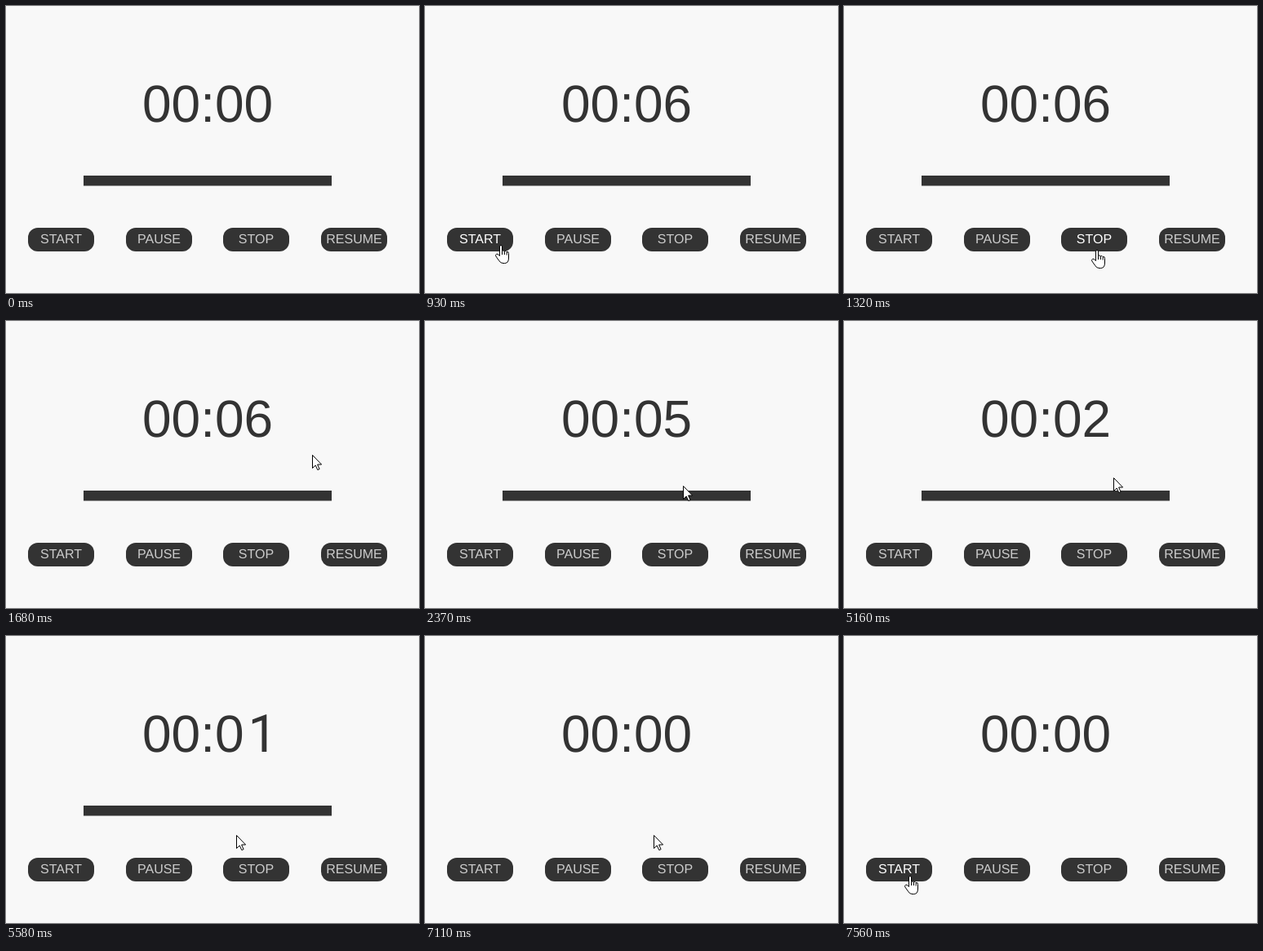
An HTML page that plays this animation: 506 px wide and 352 px high, repeating every 8 s.

```html
<!DOCTYPE html>
<html lang="en">
<head>
<meta charset="utf-8">
<title>Countdown timer</title>
<style>
  html, body { margin: 0; width: 100%; height: 100%; overflow: hidden; background: #f8f8f8; }
  svg { display: block; width: 506px; height: 352px; }
  text { font-family: "Liberation Sans", Arial, sans-serif; text-rendering: geometricPrecision; }
  .label { font-size: 16px; text-anchor: middle; }
  .one { font-family: Roboto, sans-serif; }
</style>
</head>
<body>
<svg viewBox="0 0 506 352">
  <rect width="506" height="352" fill="#f8f8f8"/>
  <text x="167" y="142" font-size="64" fill="#333">00:0<tspan id="digit">0</tspan></text>
  <rect id="bar" x="95" y="208" width="304" height="12.5" fill="#333"/>
  <g id="buttons"></g>
  <g id="cursor" fill="#fff" stroke="#000" stroke-linejoin="round">
    <path id="arrow" d="M.5 .5V16.5L4.2 13L6.8 18.6L9.1 17.6L6.6 12H11.6Z"/>
    <g id="hand" transform="translate(-6 0)">
      <path d="M5.5 13.5V2Q5.5 .5 7 .5Q8.5 .5 8.5 2V7.5Q10 5.8 11.4 7.9Q13 6.5 14.2 8.7Q16.5 7.8 16.5 10.5V16Q16.5 22.5 11.5 22.5H10Q6.8 22.5 5 19.8L.9 14Q0 12 1.5 11.3Q3 10.8 4.2 12.2Z"/>
      <path d="M8.5 7.5V12M11.4 7.9V12M14.2 8.7V12.5" fill="none"/>
    </g>
  </g>
</svg>
<script>
const LOOP = 8000, STEP = 30;
const FIRST = 750, SECOND = 955, COUNT = 6;   // countdown pace in ms
const TOP = 272, W = 81, H = 29;              // button geometry
const NS = "http://www.w3.org/2000/svg";
const $ = id => document.getElementById(id);

function add(parent, tag, attrs) {
  const el = document.createElementNS(NS, tag);
  for (const k in attrs) el.setAttribute(k, attrs[k]);
  return parent.appendChild(el);
}

const buttons = ["START", "PAUSE", "STOP", "RESUME"].map((name, i) => {
  const x = Math.round(26.8 + i * 119.8);
  const box = add($("buttons"), "rect", { x, y: TOP, width: W, height: H, rx: 12 });
  const label = add($("buttons"), "text", { x: x + W / 2, y: 291, class: "label" });
  label.textContent = name;
  return { x, box, label };
});

const linear = u => u;
const easeOut = u => 1 - (1 - u) ** 2;
const easeInOut = u => u * u * (3 - 2 * u);

// Pointer strokes through a few points; the pointer rests between them.
const strokes = [
  { from: 60, to: 480, ease: easeOut, pts: [[500, 78], [410, 140], [325, 234], [207, 236], [92, 293]] },
  { from: 930, to: 1680, ease: linear,
    pts: [[92, 293], [130, 307], [210, 322], [300, 303], [362, 265], [380, 205], [375, 164]] },
  { from: 1680, to: 2370, ease: linear, pts: [[375, 164], [345, 148], [300, 163], [292, 190], [316, 202]] },
  { from: 2370, to: 2640, ease: easeOut, pts: [[316, 202], [330, 192]] },
  { from: 5130, to: 5580, ease: easeInOut, pts: [[330, 192], [282, 244]] },
  { from: 7080, to: 7560, ease: easeInOut, pts: [[282, 244], [182, 240], [127, 262], [80, 294]] }
];

// Catmull-Rom spline, u in 0..1
function spline(pts, u) {
  const last = pts.length - 1;
  const i = Math.min(Math.floor(u * last), last - 1), f = u * last - i;
  const at = k => pts[Math.max(0, Math.min(last, k))];
  const [p, a, b, n] = [at(i - 1), at(i), at(i + 1), at(i + 2)];
  return [0, 1].map(k => Math.round(a[k] + f / 2 * (b[k] - p[k]
    + f * (2 * p[k] - 5 * a[k] + 4 * b[k] - n[k]
    + f * (3 * (a[k] - b[k]) + n[k] - p[k])))));
}

function pointer(t) {
  const s = strokes.filter(s => s.from <= t).pop();
  return s && spline(s.pts, s.ease(Math.min(1, (t - s.from) / (s.to - s.from))));
}

function inside(b, p) {
  return p && p[0] >= b.x && p[0] <= b.x + W && p[1] >= TOP && p[1] <= TOP + H;
}

function show(el, on) {
  el.setAttribute("visibility", on ? "visible" : "hidden");
}

function draw(time) {
  const t = Math.floor((time % LOOP) / STEP) * STEP;
  const pos = pointer(t), before = pointer(t - 2 * STEP);

  const left = COUNT - Math.floor((t - FIRST) / SECOND);
  const value = t < FIRST ? 0 : Math.max(0, left);
  $("digit").textContent = value;
  $("digit").setAttribute("class", value === 1 ? "one" : "");
  $("digit").setAttribute("dx", value === 1 ? 5 : 0);
  show($("bar"), left > 0);

  // Hover lets go a moment after the pointer leaves.
  let over = false;
  for (const b of buttons) {
    const hover = inside(b, pos) || inside(b, before);
    const pressed = hover && t >= 690 && t < FIRST;
    b.box.setAttribute("fill", pressed ? "#444" : "#333");
    b.label.setAttribute("fill", hover ? "#fff" : "#ccc");
    over = over || hover;
  }

  show($("arrow"), pos && !over);
  show($("hand"), pos && over);
  if (pos) $("cursor").setAttribute("transform", `translate(${pos})`);
}

const start = performance.now();
function frame() {
  draw(performance.now() - start);
  requestAnimationFrame(frame);
}
draw(0);
requestAnimationFrame(frame);
</script>
</body>
</html>
```
